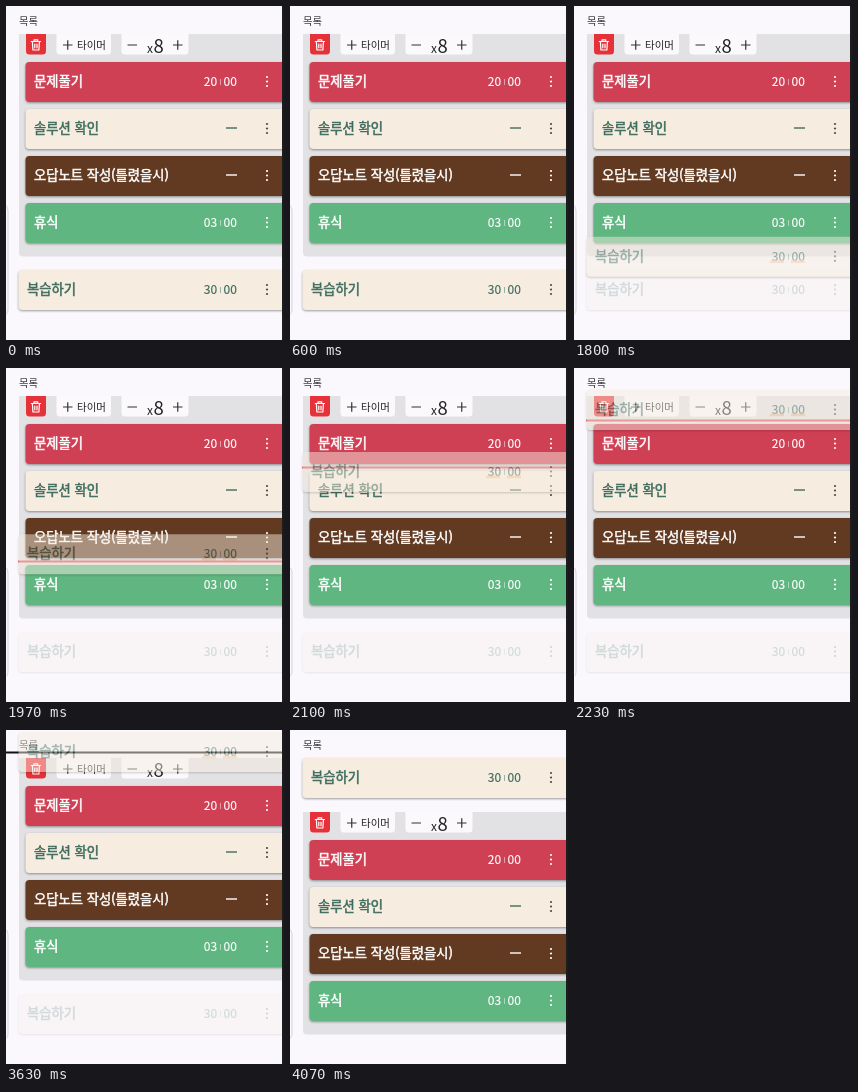
These frames come from a looping animation (278x334 px, 4130 ms). An HTML page:

```html
<!DOCTYPE html>
<html lang="ko">
<head>
<meta charset="utf-8">
<style>
  html, body { margin: 0; width: 100%; height: 100%; overflow: hidden; background: #faf8fd; }
  svg { display: block; width: 278px; height: 334px; }
  text { font-family: "Noto Sans CJK KR", "Noto Sans CJK", "Noto Sans", sans-serif; white-space: pre; }
  .name { font-size: 13.3px; stroke-width: .5px; }
  .num { font-size: 12px; stroke-width: .15px; }
  .box { filter: drop-shadow(0 1px 1.2px rgba(0, 0, 0, .38)); }
</style>
</head>
<body>
<svg viewBox="0 0 278 334">
  <rect width="278" height="334" fill="#faf8fd"/>
  <path d="M0 199.5Q2 201 2 205V304Q2 307 0 308.5" fill="none" stroke="#d5d3d8"/>
  <text x="13" y="19" font-size="10.3" fill="#333">목록</text>
  <g id="group">
    <path d="M13 28H278V250.500H17Q13 250.500 13 246.500Z" fill="#e2e1e3"/>
    <path d="M20 28H40V45Q40 48.500 36.500 48.500H23.500Q20 48.500 20 45Z" fill="#e5323a"/>
    <path d="M25.300 35.500H34.500M28 35.300V33.800H31.700V35.300M26.400 35.800L26.900 44H32.900L33.400 35.800M28.800 38V41.800M31 38V41.800"
      fill="none" stroke="#fff" stroke-width="1.2" stroke-linecap="round" stroke-linejoin="round"/>
    <g fill="#fbf9fc">
      <path d="M50.500 28H105V45Q105 48.500 101.500 48.500H54Q50.500 48.500 50.500 45Z"/>
      <path d="M115.500 28H182.500V45Q182.500 48.500 179 48.500H119Q115.500 48.500 115.500 45Z"/>
    </g>
    <path d="M57 39H66.500M61.750 34.250V43.750M121.500 39H131M167 39H176.500M171.750 34.250V43.750" stroke="#333" stroke-width="1.2"/>
    <g fill="#222">
      <text x="71" y="42.500" font-size="10.5">타이머</text>
      <text x="141" y="46.500" font-size="12">x</text>
      <text x="147.500" y="46.500" font-size="18.500">8</text>
    </g>
  </g>
  <g id="item"></g>
  <rect id="line" height="2"/>
  <g id="ghost"></g>
  <rect x="276" width="2" height="334" fill="#1c1b1d"/>
</svg>
<script>
const $ = id => document.getElementById(id);
const LOOP = 4130, FPS = 0.03;
const BEIGE = '#f6ede0', GREEN = '#3b6b5c';

// Card markup with its top left corner at (x, y)
function card(x, y, fill, name, minutes) {
  const onBeige = fill === BEIGE;
  const ink = onBeige ? GREEN : '#fff';
  const paint = `fill="${ink}" stroke="${ink}"`;
  const mid = y + 19.5;
  const value = minutes
    ? `<g class="num" ${paint}><text x="197.8" y="${mid + 4.3}">${minutes}</text>
       <text x="217.5" y="${mid + 4.3}">00</text></g>
       <path d="M214.500 ${mid - 2.5}v6" stroke="${ink}" stroke-width=".8" opacity=".6"/>`
    : `<path d="M220 ${mid - .5}h11" stroke="${onBeige ? '#456b60' : '#fff'}" stroke-width="1.4"/>`;
  const dots = [-4.5, 0, 4.5].map(d =>
    `<circle cx="261" cy="${mid + d}" r="1.1" fill="${onBeige ? '#4a4a48' : '#fff'}"/>`).join('');
  return `<path class="box" d="M278 ${y}H${x + 4}q-4 0-4 4v32q0 4 4 4H278Z" fill="${fill}"/>
    <text class="name" x="${x + 8.5}" y="${mid + 4.5}" ${paint}>${name}</text>${value}${dots}`;
}

const rows = [
  ['#cf4054', '문제풀기', '20'],
  [BEIGE, '솔루션 확인', ''],
  ['#623a21', '오답노트 작성(틀렸을시)', ''],
  ['#5fb681', '휴식', '03']
];
$('group').innerHTML += rows.map((r, i) => card(19.5, 56 + 47 * i, ...r)).join('');

const review = card(12.5, 0, BEIGE, '복습하기', '30');
const marks = '<path class="marks" d="M196 25h14M217 25h14" stroke="#f1c59c" stroke-width="2.5"/>';
$('item').innerHTML = review + marks;
$('ghost').innerHTML = review + marks;
const itemMarks = $('item').querySelector('.marks');

// Linear interpolation through [time, value] pairs
function track(keys, t) {
  if (t <= keys[0][0]) return keys[0][1];
  for (let i = 1; i < keys.length; i++) {
    const [t0, a] = keys[i - 1], [t1, b] = keys[i];
    if (t < t1) return a + (b - a) * (t - t0) / (t1 - t0);
  }
  return keys[keys.length - 1][1];
}

const DRAG = 1390, DROP = 3890;
const dragY = [[1390, 264], [1600, 257], [1780, 237], [1900, 200], [1967, 166], [2100, 84],
  [2233, 22], [2430, 16], [2700, 6], [2867, 3], [3270, 3], [3630, 2]];
const fade = [[590, 1], [1000, .52], [1390, .52], [1500, .21], [3890, .21], [4066, 1]];

function dropLine(y) {
  const mid = y + 20;
  if (mid > 250) return null;
  if (mid < 39) return { x: 0, y: 21.5, fill: '#111' };
  const gap = Math.max(0, Math.min(4, Math.round((mid - 52.5) / 47)));
  return { x: 12, y: 51.5 + 47 * gap, fill: '#dd4a50' };
}

function draw(ms) {
  const t = Math.floor((ms % LOOP + 4) * FPS) / FPS;
  const dropped = t >= DROP, dragging = t >= DRAG && !dropped;

  $('group').setAttribute('transform', `translate(0 ${dropped ? 54 : 0})`);
  $('item').setAttribute('transform', `translate(0 ${dropped ? 28 : 264})`);
  $('item').setAttribute('opacity', track(fade, t));
  itemMarks.setAttribute('opacity', track([[590, 0], [1000, 1], [1390, 1], [1450, 0]], t));

  const y = track(dragY, t);
  const line = dragging && dropLine(y);
  $('ghost').setAttribute('visibility', dragging ? 'visible' : 'hidden');
  $('ghost').setAttribute('transform', `translate(0 ${y})`);
  $('ghost').setAttribute('opacity', .48);
  $('line').setAttribute('visibility', line ? 'visible' : 'hidden');
  if (line) {
    for (const key in line) $('line').setAttribute(key, line[key]);
    $('line').setAttribute('width', 278 - line.x);
  }
}

const start = performance.now();
function tick() {
  draw(performance.now() - start);
  requestAnimationFrame(tick);
}
tick();
</script>
</body>
</html>
```
